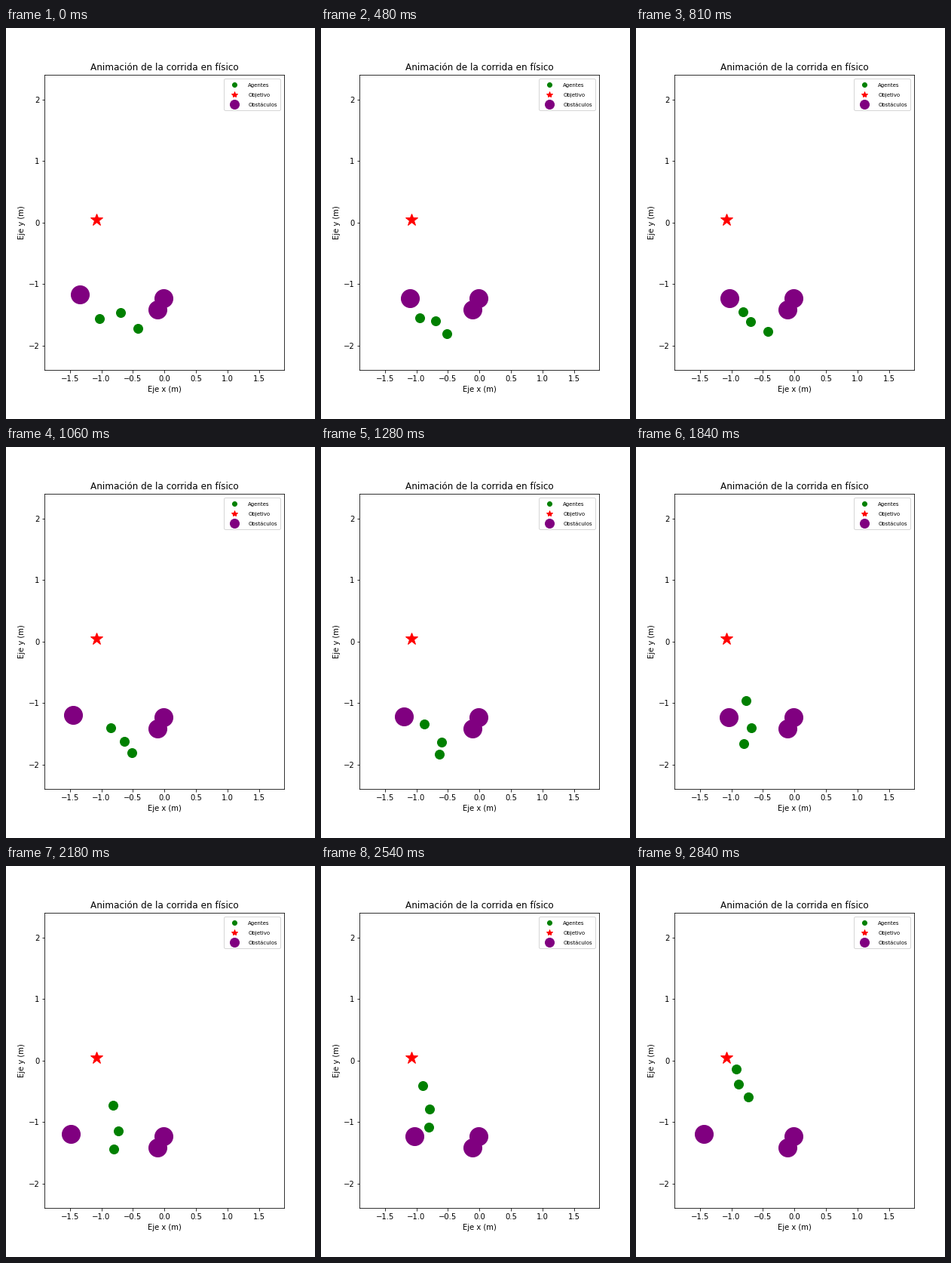
A matplotlib script for the animation above (2.86 s loop, 410 by 518 pixels).

```python
import numpy as np
import matplotlib.pyplot as plt
from matplotlib.animation import FuncAnimation

W, H, DPI = 410, 518, 72
FRAMES, STEP = 143, 20  # count, ms
XMAX, YMAX = 1.9, 2.4
BOX = dict(left=0.125, right=0.9, bottom=0.125, top=0.88)

plt.rcParams.update({"font.family": "DejaVu Sans", "font.size": 10})

clock = np.arange(FRAMES) * STEP
clock[(clock > 800) & (clock < 860)] = 800  # short stall in the run


def to_data(px, py):
    """Stage pixels to axis metres."""
    u = (np.asarray(px) / W - BOX["left"]) / (BOX["right"] - BOX["left"])
    v = (1 - np.asarray(py) / H - BOX["bottom"]) / (BOX["top"] - BOX["bottom"])
    return (2 * u - 1) * XMAX, (2 * v - 1) * YMAX


def smooth(t, v):
    """Monotone cubic through (t, v), sampled on the clock."""
    h = np.diff(t)
    d = np.diff(v) / h
    m = np.r_[d[0], np.zeros(len(d) - 1), d[-1]]
    for i in range(1, len(d)):
        if d[i - 1] * d[i] > 0:
            m[i] = 2 * d[i - 1] * d[i] / (d[i - 1] + d[i])
    at = np.minimum(clock, t[-1])
    k = np.clip(np.searchsorted(t, at, side="right") - 1, 0, len(h) - 1)
    s = (at - t[k]) / h[k]
    return ((1 + 2 * s) * (1 - s) ** 2 * v[k] + s * (1 - s) ** 2 * h[k] * m[k]
            + s * s * (3 - 2 * s) * v[k + 1] + s * s * (s - 1) * h[k] * m[k + 1])


def path(*keys):
    """Route through key points (ms, x, y)."""
    t, x, y = np.array(keys, float).T
    return to_data(smooth(t, x), smooth(t, y))


def patrol(turns, right=124, base=358.5):
    """Swing between a right stop and a left one, reversing at each turn."""
    phase = np.interp(clock, turns, np.arange(len(turns)) - 1)
    reach = np.where(clock < 800, 29.5, 38)
    back = reach * (1 + np.cos(np.pi * phase)) / 2
    slope = 0.23 - 0.13 * np.minimum(clock / 1000, 1)
    return to_data(right - back, base - slope * back)


lead = path((0, 124, 385), (480, 131, 384), (800, 142, 376), (1280, 137, 367),
            (1840, 146, 336), (2540, 135, 291), (2690, 133, 269))
middle = path((0, 152, 377), (480, 152, 388), (800, 152, 389),
              (1280, 160, 391), (1840, 153, 372), (2540, 144, 322),
              (2840, 136, 289))
last = path((0, 175, 398), (140, 182, 400), (480, 167, 405), (800, 175, 402),
            (1280, 157, 407), (1840, 143, 393), (2540, 143, 346),
            (2840, 149, 306))
agent_x, agent_y = (np.array(c) for c in zip(lead, middle, last))

rover_x, rover_y = patrol([-140, 40, 430, 600, 800, 1120, 1390, 1640,
                           1860, 2200, 2520, 2800, 2990])
fixed_x, fixed_y = to_data([209, 201], [358, 373])

# The small surplus keeps the canvas from truncating to one pixel less
fig, ax = plt.subplots(figsize=((W + 0.005) / DPI, (H + 0.005) / DPI), dpi=DPI)
fig.subplots_adjust(**BOX)
ax.set(xlim=(-XMAX, XMAX), ylim=(-YMAX, YMAX),
       xticks=np.arange(-1.5, 2, 0.5), yticks=range(-2, 3),
       xlabel="Eje x (m)", ylabel="Eje y (m)",
       title="Animación de la corrida en físico")

agents, = ax.plot([], [], "o", color="green", ms=12, label="Agentes")
ax.plot(*to_data([120], [254]), "*", color="red", ms=17, label="Objetivo")
obstacles, = ax.plot([], [], "o", color="purple", ms=24, label="Obstáculos")

legend = ax.legend(loc="upper right", markerscale=0.5, numpoints=1)
plt.setp(legend.get_texts(), fontsize="x-small")


def update(i):
    agents.set_data(agent_x[:, i], agent_y[:, i])
    obstacles.set_data(np.append(fixed_x, rover_x[i]),
                       np.append(fixed_y, rover_y[i]))
    return agents, obstacles


anim = FuncAnimation(fig, update, frames=FRAMES, interval=STEP,
                     repeat=True, repeat_delay=0)
plt.show()
```
